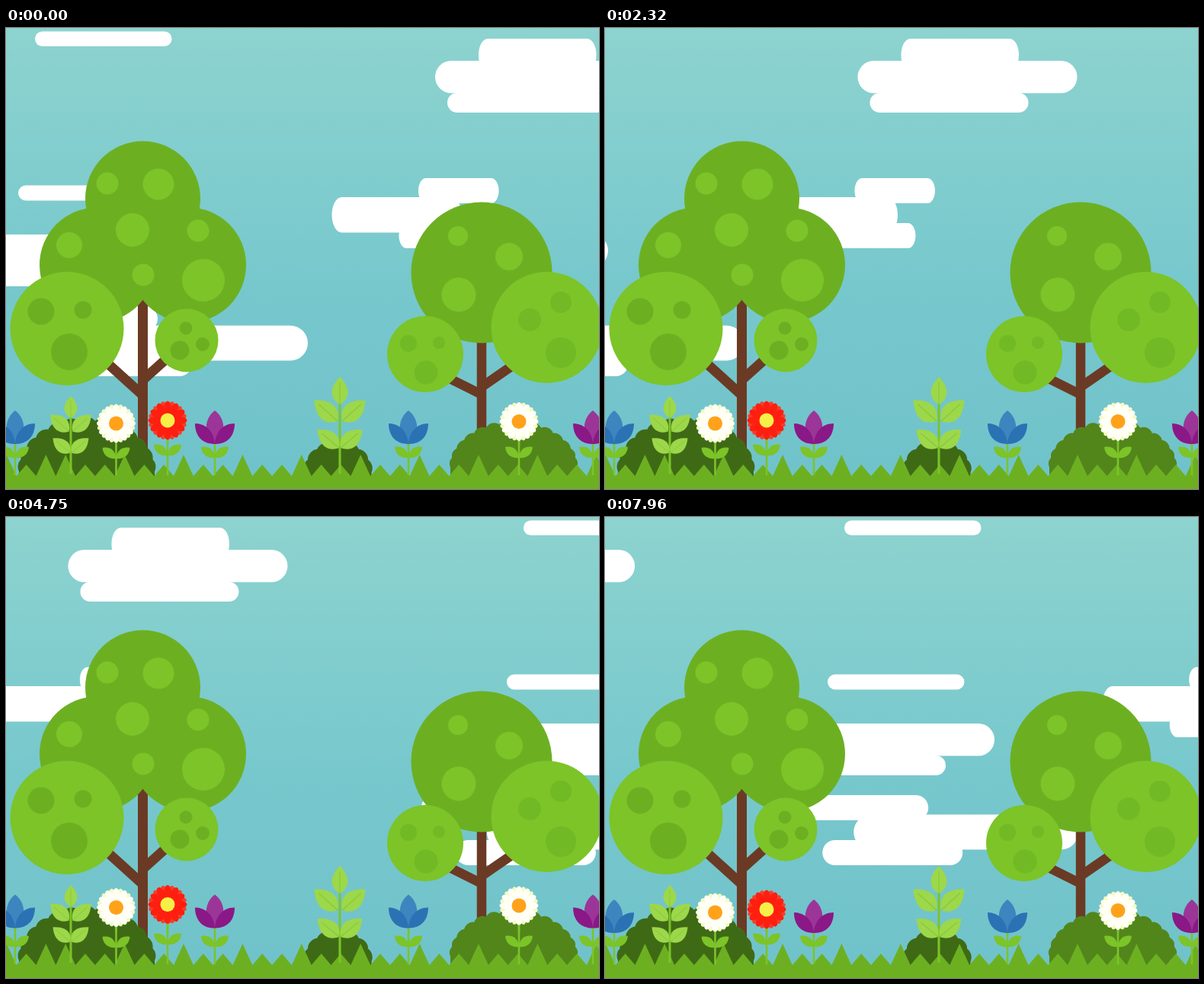
An HTML page for the animation above (7.99 s loop, 778x605 px).

```html
<!DOCTYPE html>
<html lang="en">
<head>
<meta charset="utf-8">
<title>Garden with drifting clouds</title>
<style>
  html, body { margin: 0; width: 100%; height: 100%; overflow: hidden; background: #7dcace; }
  svg { display: block; width: 100%; height: 100%; }
</style>
</head>
<body>
<svg id="stage" viewBox="0 0 778 605" preserveAspectRatio="none"></svg>
<script>
const LOOP = 7990, STEP = 30, HOLD = 70, LAST = 263;
const DARK = '#6cb022', LIGHT = '#7cc428', MUTED = '#72b926', BARK = '#6b3a24';

const circles = (fill, list) =>
  list.map(([x, y, r]) => `<circle cx="${x}" cy="${y}" r="${r}" fill="${fill}"/>`).join('');
const path = (d, fill, extra = '') => `<path d="${d}" fill="${fill}" ${extra}/>`;
const line = (d, color, width) => path(d, 'none', `stroke="${color}" stroke-width="${width}"`);
const at = (x, y, content) => `<g transform="translate(${x} ${y})">${content}</g>`;
const bar = (x, y, w, h, rx = h / 2) =>
  `<rect x="${x}" y="${y}" width="${w}" height="${h}" rx="${rx}" ry="${h / 2}" fill="#fff"/>`;

// Clouds
const topCloud = bar(620, 14, 154.5, 43, 12) + bar(563, 43, 288, 42.5) + bar(579, 85, 208, 26);
const wideClouds = bar(38, 4.5, 179.5, 19.5) + bar(16, 206.5, 179.5, 20) +
  bar(-53, 271, 288, 42.5) + bar(-37, 313, 208, 26);
const slowClouds = bar(427.5, 222, 170, 46.5, 13) + bar(541, 197, 105.5, 33, 10) +
  bar(515.5, 256, 105.5, 33, 10) + bar(15, 365, 184, 33) + bar(101, 390.5, 295, 46) + bar(60, 424, 184, 33);

// Trees
const leftTree =
  line('M179.5 340V590', BARK, 13) + line('M179.5 482L132 439M179.5 462L214 431', BARK, 13) +
  circles(DARK, [[179.5, 224, 75.5], [119.5, 311, 75.5], [239.5, 311, 75.5]]) +
  circles(LIGHT, [[133, 204, 14.5], [200, 205, 20.5], [83, 285, 17], [166, 265, 22],
    [252, 266, 14.5], [180, 324, 14.5], [259, 331, 28], [80, 394.5, 74.5], [237, 410, 41.5]]) +
  circles(DARK, [[46, 372, 17.5], [101, 370, 11.5], [83, 425, 24],
    [236, 394, 8.5], [228, 423, 12.5], [258, 415, 9]]);
const rightTree =
  line('M624 400V590', BARK, 12.5) + line('M624 481L580 459M624 471L666 442', BARK, 12.5) +
  circles(DARK, [[624, 321, 92.5]]) +
  circles(LIGHT, [[593, 273, 13], [660, 300, 18], [594, 350, 22.5], [709.5, 393, 73], [550, 428, 50]]) +
  circles(MUTED, [[728, 360, 14], [687, 383, 15], [728, 426, 20],
    [528, 414, 11], [568, 413, 8], [551, 452, 15.5]]);

function bush(cx, cy, rx, ry, bumps, fill) {
  let d = `M${cx - rx} 600L${cx - rx} ${cy}`;
  const size = Math.PI * (rx + ry) / 2 / bumps * 0.75;
  for (let i = 1; i <= bumps; i++) {
    const a = Math.PI * (1 - i / bumps);
    d += `A${size} ${size} 0 0 1 ${cx + rx * Math.cos(a)} ${cy - ry * Math.sin(a)}`;
  }
  return path(d + `L${cx + rx} 600Z`, fill);
}

function grass() {
  const pitch = 25.8;
  let d = 'M-40 605V588';
  for (let k = -10; k < 23; k++) {
    const x = 233 + k * pitch, tip = k % 3 === 0 || k === -7 ? 560 : 573;
    d += `L${x} ${tip}L${x + pitch / 2} 588`;
  }
  return path(d + 'V605Z', DARK);
}

// Flowers
const sprout = (x, top, leafY) => at(x, 0,
  line(`M0 ${top}V587`, LIGHT, 2.6) +
  [1, -1].map(s => `<g transform="translate(0 ${leafY}) scale(${s} 1)">` +
    path('M0 9C10 10 17 5 18 -5C8 -7 1 -2 0 9Z', LIGHT) + '</g>').join(''));

const tulipHead = (x, centre, side) => at(x, 502,
  path('M0 0C15 11 15 34 0 44C-15 34 -15 11 0 0Z', centre) +
  path('M0 44C-18 44 -26 32 -26 17C-11 17 -1 28 0 44ZM0 44C18 44 26 32 26 17C11 17 1 28 0 44Z', side));

const petals = (fill, turn, rx) => Array.from({ length: 12 }, (_, i) =>
  `<ellipse cy="-16.5" rx="${rx}" ry="9" fill="${fill}" transform="rotate(${i * 30 + turn})"/>`).join('');
const roundHead = (x, y, front, back, middle) => at(x, y,
  petals(back, 15, 4.6) + petals(front, 0, 4.8) + circles(front, [[0, 0, 13]]) + circles(middle, [[0, 0, 9.5]]));

const daisy = ['#fffff6', '#f4fac0', '#ffa21a'];
const sprouts = [12, 274, 528, 770].map(x => sprout(x, 535, 555)).join('') +
  sprout(144.5, 530, 556) + sprout(212, 525, 552) + sprout(673, 530, 555);
const heads = [12, 528].map(x => tulipHead(x, '#3d85bf', '#2b72b4')).join('') +
  [274, 770].map(x => tulipHead(x, '#9c3598', '#8a1886')).join('') +
  roundHead(144.5, 519, ...daisy) + roundHead(673, 516.5, ...daisy) +
  roundHead(212, 515, '#ff1f10', '#f5402a', '#f6ef48');

function plant(x, top, scale) {
  const leaf = (lx, ly, angle, length) =>
    `<g transform="translate(${lx} ${ly}) rotate(${angle}) scale(${length / 36})">` +
    path('M0 -36C14 -22 14 -8 0 0C-14 -8 -14 -22 0 -36Z', '#9dd74a') +
    line('M0 -29V0', '#83c83a', 1) + '</g>';
  return line(`M${x} ${top + 28 * scale}V585`, LIGHT, 3) +
    `<g transform="translate(${x} ${top}) scale(${scale})">` + leaf(0, 36, 0, 36) +
    [1, -1].map(s => leaf(3 * s, 58, 48 * s, 41) + leaf(s, 93, 50 * s, 37)).join('') + '</g>';
}

const stage = document.getElementById('stage');
stage.innerHTML = `
  <defs><linearGradient id="sky" x2="0" y2="1">
    <stop stop-color="#8dd3cf"/><stop offset=".55" stop-color="#77c8cd"/><stop offset="1" stop-color="#70c2ca"/>
  </linearGradient></defs>
  <rect width="778" height="605" fill="url(#sky)"/>
  <g id="slow">${slowClouds + at(974, 0, slowClouds)}</g>
  <g id="top">${topCloud}</g>
  <g id="leaving">${wideClouds}</g>
  <g id="returning">${wideClouds}</g>
  ${leftTree + rightTree}
  ${bush(106, 582, 89, 67, 13, '#3f6a15') + bush(435.5, 584, 44, 40, 7, '#3f6a15')}
  ${bush(666, 577, 83, 58, 14, '#52861b')}
  ${grass() + sprouts + plant(85, 483, 0.8) + plant(438, 458, 1)}
  <g id="stems">${[144.5, 212, 673].map(x => line(`M${x} 530V545`, LIGHT, 2.6)).join('')}</g>
  <g id="heads">${heads}</g>`;

const move = (id, x, y = 0) =>
  document.getElementById(id).setAttribute('transform', `translate(${x} ${y})`);

function render() {
  const tick = Math.max(0, Math.floor((performance.now() % LOOP - HOLD) / STEP));
  const time = tick * STEP + HOLD;
  move('slow', -2.847 * tick);
  move('top', -3.087 * tick);
  move('leaving', -3.08 * tick);
  move('returning', 276 + 3.41 * (LAST - tick));
  const offset = Math.min(1, Math.abs(time - 5050) / 1600);
  move('heads', 0, -7 * Math.cos(offset * Math.PI / 2) ** 2);
  requestAnimationFrame(render);
}
render();
</script>
</body>
</html>
```
